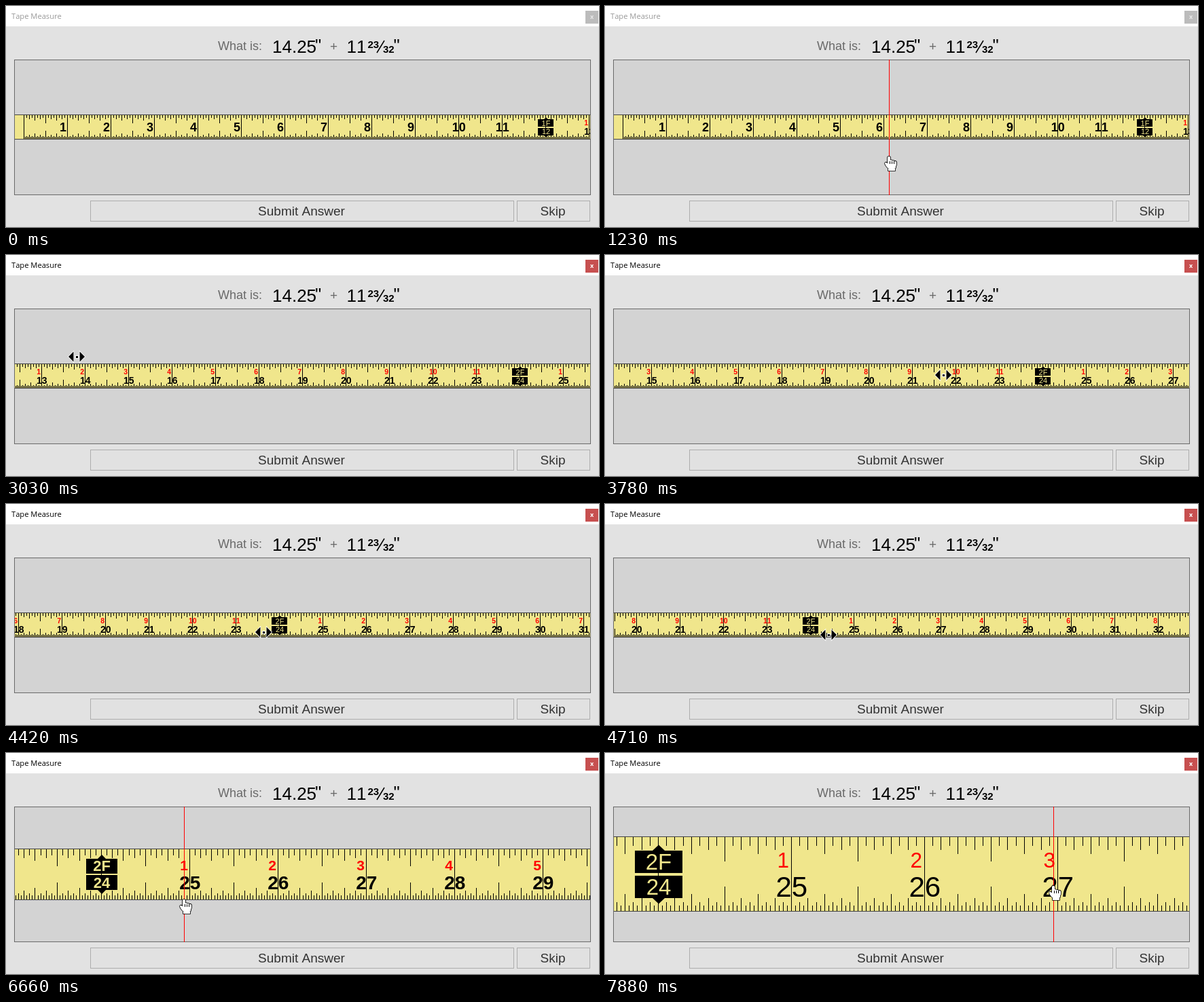
Animation, 873 px wide and 326 px high, one loop 8000 ms. Source, as an HTML page with a canvas:

```html
<!DOCTYPE html>
<html lang="en">
<head>
<meta charset="utf-8">
<title>Tape Measure</title>
<style>
  html, body { margin: 0; width: 100%; height: 100%; overflow: hidden; background: #e2e2e2; }
  canvas { display: block; }
</style>
</head>
<body>
<canvas id="stage" width="873" height="326"></canvas>
<script>
const ctx = document.getElementById('stage').getContext('2d');
ctx.fontKerning = 'none';
const SANS = '"Liberation Sans", Arial, sans-serif';
const UI = '"Open Sans", "Noto Sans", sans-serif';
const KHAKI = '#f0e68c';
const LOOP = 8000;
const MID = 179;
const PANEL = { left: 12, top: 79, right: 860, bottom: 278 };

const smooth = u => u * u * (3 - 2 * u);
const slowing = u => 1 - Math.pow(1 - u, 1.13);

// Pointer journey; the pointer rests between moves
const START = { x: 400, y: 318 };
const MOVES = [
  { from: 680, to: 1500, x: 424, y: 190 },
  { from: 1500, to: 2290, x: 501, y: 113 },
  { from: 2350, to: 3040, x: 104, y: 150, drag: true },
  { from: 3040, to: 3500, x: 553.2, y: 172 },
  { from: 3500, to: 5050, x: 280, y: 198, drag: true, ease: slowing },
  { from: 5550, to: 5850, x: 262, y: 216 },
  { from: 7090, to: 7880, x: 660, y: 196 }
];
const APPEARS = 680, ACTIVATES = 2350, ZOOMS = [6660, 7090];

const DRAG_GAIN = 2.03;
const PITCH = 64, PITCH_STEP = 66, ZOOM_X = 262;
const TAPE_HEIGHT = [36, 75, 110];
const TICK_SHARE = [0.075, 0.12, 0.175, 0.23, 0.33];

function stateAt(t) {
  let { x, y } = START, dragging = false, origin = 26;
  for (const move of MOVES) {
    if (t < move.from) break;
    const u = Math.min(1, (t - move.from) / (move.to - move.from));
    const p = (move.ease || smooth)(u);
    const dx = (move.x - x) * p;
    x += dx;
    y += (move.y - y) * p;
    dragging = Boolean(move.drag);
    if (dragging) origin += DRAG_GAIN * dx;
  }
  // The tape scrolls by whole 1/32 inch and zooms about the pointer
  origin = 2 * Math.round(origin / 2);
  const zoom = 1 + ZOOMS.filter(at => t >= at).length;
  const anchor = (ZOOM_X - origin) / PITCH;
  origin = Math.round(origin - (zoom - 1) * PITCH_STEP * anchor);
  return { x: Math.round(x), y: Math.round(y), dragging, origin, zoom };
}

function roundHalfEven(v) {
  const low = Math.floor(v);
  return v - low === 0.5 ? low + Math.abs(low % 2) : Math.round(v);
}

function rect(x, y, w, h, color) {
  ctx.fillStyle = color;
  ctx.fillRect(x, y, w, h);
}

function box(x, y, w, h, fill, border) {
  rect(x, y, w, h, border);
  rect(x + 1, y + 1, w - 2, h - 2, fill);
}

function text(str, x, y, size, color, { align = 'left', weight = '', family = SANS } = {}) {
  ctx.font = `${weight} ${size}px ${family}`;
  ctx.textAlign = align;
  ctx.fillStyle = color;
  ctx.fillText(str, x, y);
}

function paint(path, fill, stroke, width = 1.6) {
  if (stroke) {
    ctx.strokeStyle = stroke;
    ctx.lineWidth = width;
    ctx.stroke(path);
  }
  ctx.fillStyle = fill;
  ctx.fill(path);
}

function polygon(...points) {
  const path = new Path2D();
  points.forEach(([x, y]) => path.lineTo(x, y));
  path.closePath();
  return path;
}

function drawWindow(active, hover) {
  rect(0, 0, 873, 326, '#e2e2e2');
  rect(0, 0, 873, 30, '#fff');
  text('Tape Measure', 8, 19, 11.15, active ? '#000' : '#999', { family: UI });
  rect(853, 7, 19, 19, active ? '#c75050' : '#bcbcbc');
  text('x', 862.5, 19, 9, active ? '#fff' : '#e8e8e8', { align: 'center', weight: 'bold', family: UI });

  text('What is:', 312, 65, 18, '#696969');
  text('14.25', 392, 69, 26, '#000');
  text('"', 455, 67, 26, '#000');
  text('+', 477, 66, 19, '#696969');
  text('11', 501.5, 69, 26, '#000');
  text('23', 532.5, 62, 15, '#000', { weight: 'bold' });
  text('32', 555, 69, 15, '#000', { weight: 'bold' });
  text('"', 570.5, 67, 26, '#000');
  paint(polygon([546, 69], [557, 51]), '#000', '#000', 1.5);

  const { left, top, right, bottom } = PANEL;
  box(left, top, right - left + 1, bottom - top + 1, '#d3d3d3', '#696969');
  box(124, 287, 624, 31, hover ? '#e5f1fb' : '#e1e1e1', hover ? '#0078d7' : '#adadad');
  box(752, 287, 108, 31, '#e1e1e1', '#adadad');
  text('Submit Answer', 435, 309, 19, '#333', { align: 'center' });
  text('Skip', 805, 309, 19, '#333', { align: 'center' });
}

// The first digit sits left of the inch line, the second one right of it
function drawLabel(value, x, dy, size, color, zoom) {
  const str = String(value);
  const shift = str.length > 1 ? 0.8 : -0.278 * size - zoom;
  const weight = zoom < 3 ? 'bold' : '';
  text(str, x + shift, MID + dy + 0.34 * size, size, color, { align: 'center', weight });
}

function drawFoot(inch, x, zoom) {
  const cx = x + 1;
  const weight = zoom === 2 ? 'bold' : '';
  for (const [side, str] of [[-1, inch / 12 + 'F'], [1, String(inch)]]) {
    const near = Math.round(MID + side * 0.6 * zoom);
    const far = Math.round(MID + side * 11.7 * zoom);
    rect(Math.round(cx - 11.7 * zoom), near, Math.floor(23.4 * zoom), far - near, '#000');
    paint(polygon([cx - 3 * zoom, far], [cx + 3 * zoom, far], [cx, MID + side * 14.5 * zoom]), '#000');
    text(str, cx, MID + side * 6.2 * zoom + 3.7 * zoom, 11 * zoom, KHAKI, { align: 'center', weight });
  }
}

function drawTape(zoom, origin) {
  const pitch = PITCH + PITCH_STEP * (zoom - 1);
  const height = TAPE_HEIGHT[zoom - 1];
  const top = Math.floor(178.5 - height / 2), bottom = top + height;
  const { left, right } = PANEL;
  ctx.save();
  ctx.beginPath();
  ctx.rect(left + 1, top, right - left - 1, height + 1);
  ctx.clip();
  rect(left, top, right - left, height + 1, '#444');
  rect(left, top + 1, right - left, height - 1, KHAKI);

  const first = Math.max(0, Math.floor((left - origin) / pitch));
  const last = Math.ceil((right - origin) / pitch);
  for (let i = first * 32; i <= last * 32; i++) {
    const x = roundHalfEven(origin + i * pitch / 32);
    if (i % 32 === 0) {
      rect(x, top + 1, 1, height - 1, '#000');
      continue;
    }
    const level = 31 - Math.clz32(i & -i);
    const length = Math.round(TICK_SHARE[level] * height);
    if (level > 0) rect(x, top + 1, 1, length, '#000');
    rect(x, bottom - length, 1, length, '#000');
  }

  for (let inch = Math.max(1, first); inch <= last; inch++) {
    const x = origin + inch * pitch;
    if (x <= left || x >= right) continue;
    if (inch % 12 === 0) {
      drawFoot(inch, x, zoom);
    } else if (inch < 12) {
      drawLabel(inch, x, 0, 18 * zoom, '#000', zoom);
    } else {
      drawLabel(inch % 12, x, -6.8 * zoom, 10.5 * zoom, '#f00', zoom);
      drawLabel(inch, x, 6.2 * zoom, 14 * zoom, '#000', zoom);
    }
  }
  ctx.restore();
}

function drawHand() {
  const hand = new Path2D();
  for (let i = 0; i < 4; i++) {
    const top = i ? 4.5 + i * 0.8 : 0;
    hand.roundRect(3 * i - 2, top, 4, 14 - top, 1.5);
  }
  hand.roundRect(-2, 9, 12, 9, 2);
  hand.rect(-1, 16, 10, 5);
  hand.ellipse(-2.5, 13, 2, 5, -0.6, 0, 2 * Math.PI);
  paint(hand, '#fff', '#000');
  for (let x = 1; x < 10; x += 3) rect(x, 7, 1, 4, '#000');
}

function drawArrow() {
  paint(polygon([0, 0], [0, 16], [3.7, 12.6], [6.2, 18.4], [8.6, 17.4], [6.2, 11.7], [11.4, 11.7]),
    '#fff', '#000');
}

function drawGrip() {
  for (const side of [-12, 12]) {
    paint(polygon([side, 0], [side * 0.38, -7.5], [side * 0.38, 7.5]), '#000', '#fff');
  }
  box(-2, -2, 5, 5, '#000', '#fff');
}

function draw(t) {
  const { x, y, dragging, origin, zoom } = stateAt(t);
  const { top, bottom } = PANEL;
  const shown = t >= APPEARS;
  const inPanel = y >= top && y <= bottom;

  drawWindow(t >= ACTIVATES, shown && y >= 287 && y < 318);
  drawTape(zoom, origin);
  if (!shown) return;
  if (inPanel && !dragging) rect(x, top, 1, bottom - top + 1, '#f00');
  ctx.save();
  ctx.translate(x, y);
  if (dragging) drawGrip();
  else if (inPanel) drawHand();
  else drawArrow();
  ctx.restore();
}

const begin = performance.now();
function frame() {
  draw((performance.now() - begin) % LOOP);
  requestAnimationFrame(frame);
}
frame();
</script>
</body>
</html>
```
